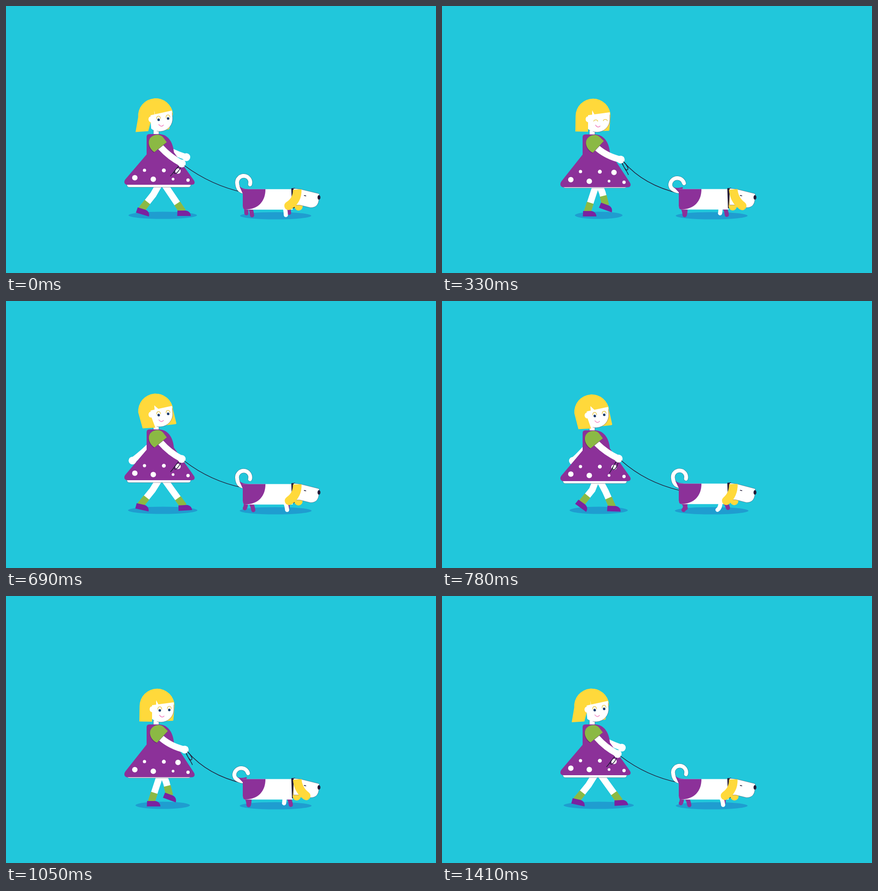
Write an HTML page with a canvas that moves like this. It is 948 px wide and 590 px high and loops after 1440 ms.

```html
<!DOCTYPE html>
<html lang="en">
<head>
<meta charset="utf-8">
<title>Walking the dog</title>
<style>
html, body { margin: 0; width: 100%; height: 100%; overflow: hidden; background: #21c7db; }
canvas { display: block; width: 948px; height: 590px; }
</style>
</head>
<body>
<canvas id="stage" width="948" height="590"></canvas>
<script>
const c = document.getElementById('stage').getContext('2d');
const LOOP = 1440, STEP = 720, TICK = 30;
const SKY = '#21c7db', SHADE = '#1f9dd0', PURPLE = '#8c3199', SHOE = '#7a22a0',
  GREEN = '#8bb944', YELLOW = '#ffd93b', WHITE = '#fff', DARK = '#241c38',
  LINE = 'rgba(36,28,56,.6)';
const TAU = Math.PI * 2, rad = d => d * Math.PI / 180;

// Four poses per step; a track holds one or two steps and wraps around.
const keyTime = k => Math.floor(k / 4) * STEP + [0, 150, 330, 510][k & 3];

function track(t, v) {
  const n = v.length, span = n / 4 * STEP;
  t = ((t % span) + span) % span;
  let k = n - 1;
  while (keyTime(k) > t) k--;
  const val = i => v[(i + n) % n];
  const slope = i => (val(i + 1) - val(i - 1)) / (keyTime(i + 1) - keyTime(i - 1));
  const d = keyTime(k + 1) - keyTime(k), u = (t - keyTime(k)) / d, w = 1 - u;
  return val(k) * w * w * (1 + 2 * u) + val(k + 1) * u * u * (3 - 2 * u)
    + d * u * w * (w * slope(k) - u * slope(k + 1));
}

function fill(path, color, edge) {
  const p = new Path2D(path);
  c.fillStyle = color;
  c.fill(p);
  if (edge) { c.strokeStyle = LINE; c.lineWidth = .7; c.stroke(p); }
}

function stroke(path, color, width, cap = 'round') {
  c.strokeStyle = color;
  c.lineWidth = width;
  c.lineCap = cap;
  c.stroke(new Path2D(path));
}

function oval(x, y, rx, ry, color) {
  c.fillStyle = color;
  c.beginPath();
  c.ellipse(x, y, rx, ry, 0, 0, TAU);
  c.fill();
}

const dot = (x, y, r, color) => oval(x, y, r, r, color);

function group(x, y, deg, draw) {
  c.save();
  c.translate(x, y);
  c.rotate(rad(deg));
  draw();
  c.restore();
}

function spin(x, y, deg, draw) {
  group(x, y, deg, () => { c.translate(-x, -y); draw(); });
}

function girlLeg(t, hipY) {
  const x = track(t, [388, 348, 321, 298, 300, 328, 360, 383]);
  const y = track(t, [452, 453, 453, 453, 448, 440, 438, 444.5]);
  const tilt = track(t, [0, 0, 0, 0, 17, 61, 20, -28]);
  const bend = track(t, [0, 4, 0, 2, 3, 8, 2, 1]);
  const kx = (343 + x) / 2 + bend, ky = (hipY + y) / 2 + bend * .2;
  const len = Math.hypot(x - kx, y - ky), ux = (x - kx) / len, uy = (y - ky) / len;
  stroke(`M343 ${hipY}L${kx} ${ky}L${x} ${y}`, WHITE, 14.5, 'butt');
  stroke(`M${x - ux * 19} ${y - uy * 19}L${x + ux * 3} ${y + uy * 3}`, GREEN, 15.5, 'butt');
  group(x, y, tilt, () => fill('M-10 0H8C15 1 19 5 19.5 12H-10.5Z', SHOE));
}

function backArm(t) {
  const x = track(t, [397.5, 372, 345, 312, 278, 316, 345, 370]);
  const y = track(t, [334, 343, 346, 348, 352, 347, 346, 343]);
  stroke(`M332 304Q${(332 + x) / 2} ${(304 + y) / 2 + 4} ${x} ${y}`, WHITE, 13);
  dot(x, y, 8.7, WHITE);
}

function skirt(t) {
  const k = 1 + track(t, [0, 1.8, 4.8, 3.4]) / 60;
  const y = v => 335 + (v - 335) * k;
  c.save();
  c.translate(0, 335 * (1 - k));
  c.scale(1, k);
  fill('M310 328L264 382C259 387 260 395 268 395H409C417 395 417 389 414 385L370 323Z', PURPLE);
  c.restore();
  [[284, 379.5, 6], [305.3, 363, 3.6], [324.7, 382.7, 6], [348, 363.2, 4.3],
   [368.3, 382.6, 3], [379.2, 364.7, 6], [401.3, 384.8, 3.7]]
    .forEach(([px, py, r]) => dot(px, y(py), r, WHITE));
}

function head(t) {
  const sway = track(t, [0, 3, 8, 11.5, 15.5, 12.5, 8, 4.5]) - 8;
  const shut = Math.min(1, Math.max(0, track(t, [0, 0, 1, .25, 0, 0, 0, 0])));
  spin(331, 280, track(t, [-5, -2.5, 0, -1.2]), () => {
    const left = 294 + sway, lock = left + 28, right = 369 + sway;
    const low = 276.5 + sway * .25;
    // hair behind the face
    fill(`M333 204A38.5 38.5 0 0 1 371.5 242.5L${right} 273Q${right} 275 ${right - 3} 275L340 276V220Z`, YELLOW);
    fill('M321 234L321 270Q329 278 342 278A28 28 0 0 0 370 250V232Z', WHITE);
    stroke('M333 276.5Q337 278 342 278A28 28 0 0 0 370 250V240', LINE, .7);
    // fringe and side lock
    fill(`M${left} ${low}L294.5 242.5A38.5 38.5 0 0 1 371.5 242.5L371 234L322 240.5V253L${lock} ${low + .6}Z`, YELLOW);
    fill(`M331 241V229.5L${332 + (sway + 8) * .55} 239.5Z`, WHITE);
    oval(322, 249.5, 5.3, 6.5, WHITE);
    for (const [x, y] of [[339, 252], [360, 251]]) {
      if (shut < .6) dot(x, y, 2.8, '#1d3b6c');
      const top = y - 8 + shut * 7, rise = 5.5 - shut * 2.5;
      stroke(`M${x - 4.3} ${top + rise}Q${x - 4} ${top} ${x} ${top}Q${x + 4} ${top} ${x + 4.3} ${top + rise}`, '#e6c33a', 1.3);
    }
    stroke('M338.5 262.5Q343.5 270 348.5 264.5', '#f07fc0', 1.5);
  });
}

function handPose(t) {
  return {
    x: track(t, [387.5, 393, 394, 389]),
    y: track(t, [348, 341, 338.7, 346]),
    cx: track(t, [361, 362, 362, 358]),
    cy: track(t, [334, 331, 331, 337])
  };
}

function frontArm(t, h) {
  group(h.x, h.y, track(t, [36, 0, -33, 0]), () => {
    stroke('M-1 8C-5 20-2 28-4 37M-2 8C-3 18-4 27 0 27S5 18 3 8', DARK, 1.5);
  });
  stroke(`M341 312Q${h.cx} ${h.cy} ${h.x} ${h.y}`, WHITE, 14);
  dot(h.x, h.y, 8.7, WHITE);
  const turn = track(t, [0, -3, -8, -5]);
  const sleeve = 'M327 323C315 315 312 301 317 293C325 282 341 282 347 291L354.5 301Z';
  group(-turn * .35, 0, 0, () => spin(332, 303, turn, () => {
    group(-.8, 1.2, 0, () => fill(sleeve, '#6c2079'));
    fill(sleeve, GREEN);
  }));
}

function girl(t, beat, h) {
  const bob = 10.6 * beat;
  oval(345.5, 462.5, track(t, [75.5, 45, 52.5, 66.5, 75.5, 45, 60, 75]), 8, SHADE);
  group(0, bob, 0, () => backArm(t));
  girlLeg(t + STEP, 385 + bob);
  girlLeg(t, 385 + bob);
  group(0, bob, 0, () => {
    const drop = track(t, [0, .3, 1, .5]);
    group(0, drop, 0, () =>
      fill('M266.5 390H407.5V395Q407 400.5 402 400.5H272Q267 400.5 266.5 395Z', WHITE, true));
    fill('M325 274H337V286H325Z', WHITE, true);
    fill('M310 332V289Q310 283 316 283H338C358 284 370 302 370.5 330Z', PURPLE);
    skirt(t);
    frontArm(t, h);
    head(t);
  });
}

function dogLeg(t, hipX, hipY, xs, ys, color) {
  const x = track(t, xs), y = track(t, ys), dx = x - hipX;
  const bend = dx < 0 ? `${hipX} ${y - 4}` : `${hipX + dx * .7} ${hipY + 3}`;
  stroke(`M${hipX} ${hipY}Q${bend} ${x} ${y}`, color, 9.2);
}

function dogTail(s) {
  const q = 1 - s, r = 14.6 + .4 * q, x = 524 - 2.7 * q, y = 390 + 3 * q;
  const end = rad(17 - 16 * q);
  const curl = `M522 410Q${x - r + 1} 407 ${x - r} ${y}A${r} ${r} 0 0 1 ${x} ${y - r}`
    + `A${r} ${r} 0 0 1 ${x + r * Math.cos(end)} ${y + r * Math.sin(end)}`;
  stroke(curl, LINE, 9.6);
  stroke(curl, WHITE, 8.6);
  spin(520, 409, -10 * q, () => fill('M514.5 398Q520 404 533 404.5L528 415H522Q518 406 514.5 398Z', PURPLE));
}

function dogHead(t, beat) {
  const s = Math.cos(t / STEP * TAU);
  const swing = -20 * Math.sign(s) * Math.abs(s) ** 1.6, lean = Math.abs(swing) / 20;
  spin(688, 423, 4.5 * beat, () => {
    stroke(`M643 415L${643 + 2 * s} 443`, YELLOW, 18);
    fill('M634 403L650 405L689 414.5Q691 415 690.5 418L689.5 430C688 441 681 446 671 445.5L648 440H634Z', WHITE, true);
    oval(690, 423, 3.2, 5, DARK);
    stroke('M657.5 418.8L661 419.6', DARK, 1.6);
    const ex = 643 + swing, ey = 447 - 5.5 * lean;
    const kx = 643 + (swing > 0 ? 1 : 0) * lean, ky = 426 + 3 * lean;
    stroke(`M642 405.5Q${kx} ${ky} ${ex} ${ey}`, YELLOW, 19, 'butt');
    dot(ex, ey, 9.5, YELLOW);
  });
}

function dog(t, beat) {
  const lift = -5 * beat, hip = 445 + lift;
  oval(594.5, 463.5, 78.5 + 10.5 * beat, 8, SHADE);
  dogLeg(t, 529, hip, [530, 545, 535, 508.5], [458, 458, 462, 457.5], PURPLE);
  dogLeg(t, 537, hip, [542.5, 519, 535, 553], [462.5, 460, 462, 457.5], PURPLE);
  dogLeg(t, 621, hip, [624, 637, 628, 602], [457, 458, 461.5, 457], PURPLE);
  dogLeg(t, 614, hip, [617, 595, 613, 629], [462, 459.5, 458, 457.5], WHITE);
  group(0, lift, 0, () => {
    dogTail(Math.cos(t / STEP * TAU));
    fill('M522 404.8H632V450H530Q522 450 522 442Z', WHITE);
    fill('M522 404.8H572C572 432 556 449 528 450Q522 450 522 442Z', PURPLE);
    fill('M629 403L637 402L639 445.5L630.5 447.5Z', DARK);
  });
  dogHead(t, beat);
}

function leash(t, bob, h) {
  const cx = track(t, [452, 442, 445, 439]), cy = track(t, [396, 411, 396, 424]);
  const end = track(t, [412, 430, 414, 428]);
  stroke(`M${h.x + 6.5} ${h.y + bob + 5}Q${cx} ${cy} 523 ${end}`, DARK, 1.5);
}

function draw(now) {
  const t = Math.floor(now % LOOP / TICK) * TICK;
  const beat = (1 - Math.cos(t / STEP * 2 * TAU)) / 2;
  const h = handPose(t);
  c.fillStyle = SKY;
  c.fillRect(0, 0, 948, 590);
  girl(t, beat, h);
  leash(t, 10.6 * beat, h);
  dog(t, beat);
}

let start;
function tick(now) {
  start ??= now;
  draw(now - start);
  requestAnimationFrame(tick);
}
draw(0);
requestAnimationFrame(tick);
</script>
</body>
</html>
```
